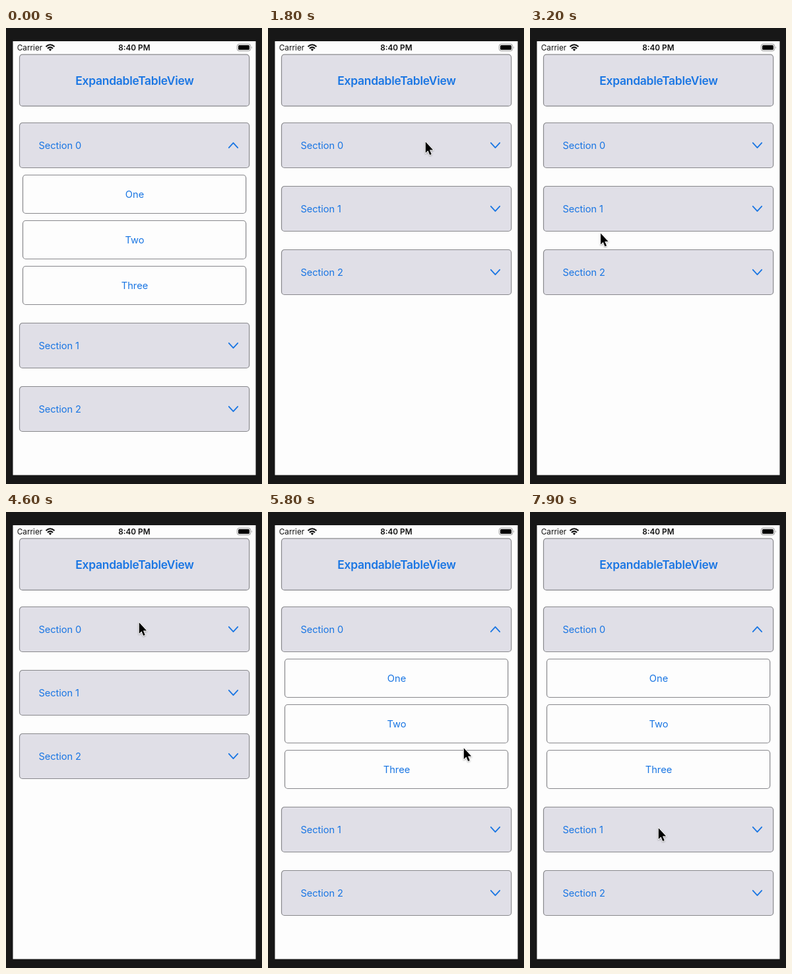
An HTML page that plays this animation: 388x690 px, repeating every 8000 ms.

```html
<!DOCTYPE html>
<html lang="en">
<head>
<meta charset="utf-8">
<title>Expandable table</title>
<style>
  html, body { margin: 0; width: 100%; height: 100%; overflow: hidden; background: #171717; }
  svg { display: block; width: 388px; height: 690px; }
  text { font: 14.7px Inter, "Open Sans", sans-serif; letter-spacing: -.1px; fill: #1a76e3; }
  .mid { text-anchor: middle; }
  .title { font-size: 17.5px; font-weight: 600; letter-spacing: -.3px; }
  .label { letter-spacing: 0; }
  .status { font-size: 11.8px; letter-spacing: 0; fill: #111; }
  .clock { font-weight: 600; }
  .card { fill: #e0dfe7; stroke: #88888c; stroke-width: 1.2; }
  .row { fill: #fdfdfd; }
  .chevron { fill: none; stroke: #1a76e3; stroke-width: 1.8; stroke-linecap: round; stroke-linejoin: round; }
  .wifi { fill: none; stroke: #111; stroke-width: 2; }
  .pointer { fill: #000; stroke: #fff; stroke-width: 1.8; stroke-linejoin: round; paint-order: stroke;
    filter: drop-shadow(0 1px 1px rgba(0, 0, 0, .3)); }
</style>
</head>
<body>
<svg id="stage" viewBox="0 0 388 690">
  <rect width="388" height="690" fill="#171717"/>
  <rect x="10.5" y="20" width="368" height="656.5" fill="#fdfdfd"/>
  <text class="status" x="16.7" y="34.3">Carrier</text>
  <g class="wifi">
    <path d="M60.5 28.3Q67 22.3 73.5 28.3"/>
    <path d="M62.9 31Q67 27.2 71.1 31"/>
    <path d="M64.8 32.4Q67 30.8 69.2 32.4L67 35Z" fill="#111" stroke="none"/>
  </g>
  <text class="status clock mid" x="194.4" y="34.3">8:40 PM</text>
  <rect x="350.4" y="24.4" width="20.2" height="10.2" rx="2.8" fill="none" stroke="#888" stroke-width=".9"/>
  <rect x="352" y="26" width="17" height="7" rx="1.5" fill="#000"/>
  <path d="M372 27.6q1.5 1.9 0 3.8z" fill="#888"/>
  <g id="list"></g>
  <path id="pointer" class="pointer" d="M.8 1.2V18L4.5 14.5L7.2 21L9.8 20L7 13.5H12.2Z"/>
</svg>
<script>
const LOOP = 8000, STEP = 100;
const CLOSE_AT = 1800, OPEN_AT = 5000;
const ROWS_HEIGHT = 207;

// Pointer sweeps: each curves from where the last one ended through a few key points.
const sweeps = [
  { start: 300, steps: 1, keys: [[33, 414]] },
  { start: 700, steps: 2, keys: [[104, 221]] },
  { start: 1200, steps: 6, keys: [[150, 118], [222, 122], [238, 171]] },
  { start: 2000, steps: 9, keys: [[150, 245], [98, 95], [288, 80], [262, 315]] },
  { start: 2900, steps: 9, keys: [[172, 345], [95, 285], [100, 85], [199, 162]] },
  { start: 3800, steps: 1, keys: [[202, 167]] },
  { start: 4600, steps: 1, keys: [[201, 166]] },
  { start: 5200, steps: 7, keys: [[192, 154], [322, 245], [296, 356]] },
  { start: 6300, steps: 7, keys: [[340, 418], [270, 432], [208, 372]] },
  { start: 7100, steps: 9, keys: [[218, 208], [264, 270], [194, 477]] }
];
sweeps.forEach((sweep, i) => {
  const from = i ? sweeps[i - 1].keys.at(-1) : sweep.keys[0];
  sweep.keys.unshift(from);
});

const list = document.getElementById("list");
const pointer = document.getElementById("pointer");

function add(parent, tag, attrs, text = "") {
  const node = document.createElementNS("http://www.w3.org/2000/svg", tag);
  for (const key in attrs) node.setAttribute(key, attrs[key]);
  node.textContent = text;
  return parent.appendChild(node);
}

function addCard(parent, x, y, height, kind = "") {
  add(parent, "rect", { class: "card " + kind, x, y, width: 389.2 - 2 * x, height, rx: 4.5 });
}

function addSection(index) {
  const group = add(list, "g", {});
  addCard(group, 20.5, 0, 68);
  add(group, "text", { x: 49.5, y: 39.5 }, "Section " + index);
  const chevron = add(group, "path", { class: "chevron", d: "M-6.7 -3.7L0 3.7L6.7 -3.7" });
  return { group, chevron };
}

addCard(list, 20.5, 40.2, 78);
add(list, "text", { class: "title mid", x: 195, y: 85.5 }, "ExpandableTableView");
const sections = [0, 1, 2].map(addSection);
const rows = add(list, "g", {});
["One", "Two", "Three"].forEach((label, i) => {
  const y = 222.5 + 69 * i;
  addCard(rows, 25.5, y, 58, "row");
  add(rows, "text", { class: "label mid", x: 195, y: y + 34.5 }, label);
});

// Catmull-Rom curve through evenly timed keys, for k from 0 to 1.
function along(keys, k) {
  const last = keys.length - 1;
  const i = Math.min(Math.floor(k * last), last - 1);
  const u = k * last - i;
  const key = n => keys[Math.max(0, Math.min(n, last))];
  return [0, 1].map(axis => {
    const [a, b, c, d] = [-1, 0, 1, 2].map(n => key(i + n)[axis]);
    return b + u / 2 * (c - a + u * (2 * a - 5 * b + 4 * c - d + u * (3 * (b - c) + d - a)));
  });
}

function pointerAt(time) {
  const sweep = sweeps.findLast(({ start }) => time >= start);
  if (!sweep) return null;
  const step = Math.floor((time - sweep.start) / STEP) + 1;
  return along(sweep.keys, Math.min(step / sweep.steps, 1));
}

function render(time) {
  const open = time < CLOSE_AT || time >= OPEN_AT;
  rows.style.display = open ? "" : "none";
  sections.forEach(({ group, chevron }, i) => {
    const y = 143.5 + 96 * i + (open && i ? ROWS_HEIGHT : 0);
    const flip = open && !i ? -1 : 1;
    group.setAttribute("transform", `translate(0 ${y})`);
    chevron.setAttribute("transform", `translate(344.5 34) scale(1 ${flip})`);
  });
  const spot = pointerAt(time);
  pointer.style.display = spot ? "" : "none";
  if (spot) pointer.setAttribute("transform", `translate(${spot})`);
}

const begin = performance.now();
function tick() {
  render((performance.now() - begin) % LOOP);
  requestAnimationFrame(tick);
}
tick();
</script>
</body>
</html>
```
